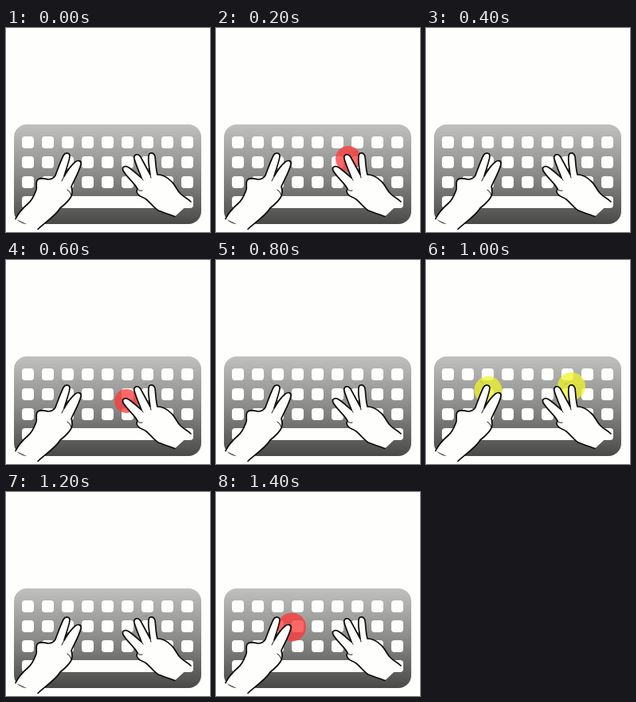
Write an HTML page with a canvas that moves like this. It is 256 px wide and 256 px high and loops after 1600 ms.

```html
<!DOCTYPE html>
<html lang="en">
<head>
<meta charset="utf-8">
<title>Typing hands</title>
<style>
html, body { margin: 0; width: 100%; height: 100%; overflow: hidden; background: #fefefc; }
canvas { display: block; width: 256px; height: 256px; }
</style>
</head>
<body>
<canvas id="stage" width="256" height="256"></canvas>
<script>
const ctx = document.getElementById('stage').getContext('2d');
const LOOP = 1600, STEP = 200;
const WHITE = '#fefefc';
const RED = 'rgba(255,56,56,0.76)';
const YELLOW = 'rgba(240,244,40,0.75)';

// Highlights per 200 ms step: x, y, radius, colour
const presses = {
  1: [[166, 164, 16, RED]],
  3: [[151, 177, 15, RED]],
  5: [[78, 163.5, 17.5, YELLOW], [182.5, 158.5, 17.5, YELLOW]],
  7: [[95, 169.5, 18, RED]]
};

const leftHand = new Path2D(`M12 239.5 C15 233 20 227 28 220 C34 215 36 208 38 203
  C39 199 37 195 39 191 C42 187 48 189 53 190 C57 190 60 188 62 185
  C65 177 68 168 72 160 C74 156 80 156 80 161 C79 169 75 178 73 186
  C77 179 82 172 87 168 C91 165 95 167 94 171 C92 180 86 190 82 199
  C83 203 84 206 82 211 C79 217 73 222 68 226 C63 235 50 243 40 252.5`);
const leftFolds = new Path2D('M73 186 L70 192 M77 203 Q81 205 82 210');

const rightHand = new Path2D(`M212 236.5 C206 234 198 232 191 229 C185 225 181 219 176 215
  C172 212 168 212 166 209 C163 206 164 204 165 202 C162 195 152 188 147 179
  C145 174 150 172 154 175 C160 179 165 184 170 188 C167 180 163 172 161 164
  C160 158 166 157 169 162 C173 169 177 177 181 184 C180 176 178 168 179 161
  C179 156 185 155 187 161 C188 169 188 177 190 184 C196 184 202 187 207 192
  C212 196 214 203 219 208 C223 212 228 214 232 218`);
const rightFolds = new Path2D('M170 188 L172 191 M181 184 L182 188 M165 202 Q167 205 171 204');
const specks = new Path2D('M68 152 L72 155 M174 156 L177 155');

const gradient = ctx.createLinearGradient(0, 121, 0, 246);
gradient.addColorStop(0, '#c0c1be');
gradient.addColorStop(0.5, '#8b8c89');
gradient.addColorStop(1, '#494a47');

function box(x, y, w, h, r, fill) {
  ctx.fillStyle = fill;
  ctx.beginPath();
  ctx.roundRect(x, y, w, h, r);
  ctx.fill();
}

function line(path, width, color) {
  ctx.lineWidth = width;
  ctx.strokeStyle = color;
  ctx.stroke(path);
}

function drawKeyboard() {
  box(10, 121, 235, 125, 16, gradient);
  for (let row = 0; row < 3; row++) {
    for (let col = 0; col < 9; col++) box(20 + col * 25, 136 + row * 25, 15, 15, 4, WHITE);
  }
  box(20, 211, 215, 15, 4, WHITE);
}

function drawHand(outline, folds) {
  ctx.fillStyle = WHITE;
  ctx.fill(outline);
  line(outline, 1.7, '#0c0c0c');
  line(folds, 1, '#0c0c0c');
}

function draw(time) {
  const step = Math.floor((time % LOOP) / STEP);
  ctx.fillStyle = WHITE;
  ctx.fillRect(0, 0, 256, 256);
  drawKeyboard();
  for (const [x, y, r, color] of presses[step] || []) {
    ctx.fillStyle = color;
    ctx.beginPath();
    ctx.arc(x, y, r, 0, Math.PI * 2);
    ctx.fill();
  }
  line(specks, 0.7, 'rgba(60,60,60,0.35)');
  drawHand(leftHand, leftFolds);
  drawHand(rightHand, rightFolds);
}

ctx.lineCap = ctx.lineJoin = 'round';
const start = performance.now();
function tick() {
  draw(performance.now() - start);
  requestAnimationFrame(tick);
}
tick();
</script>
</body>
</html>
```
